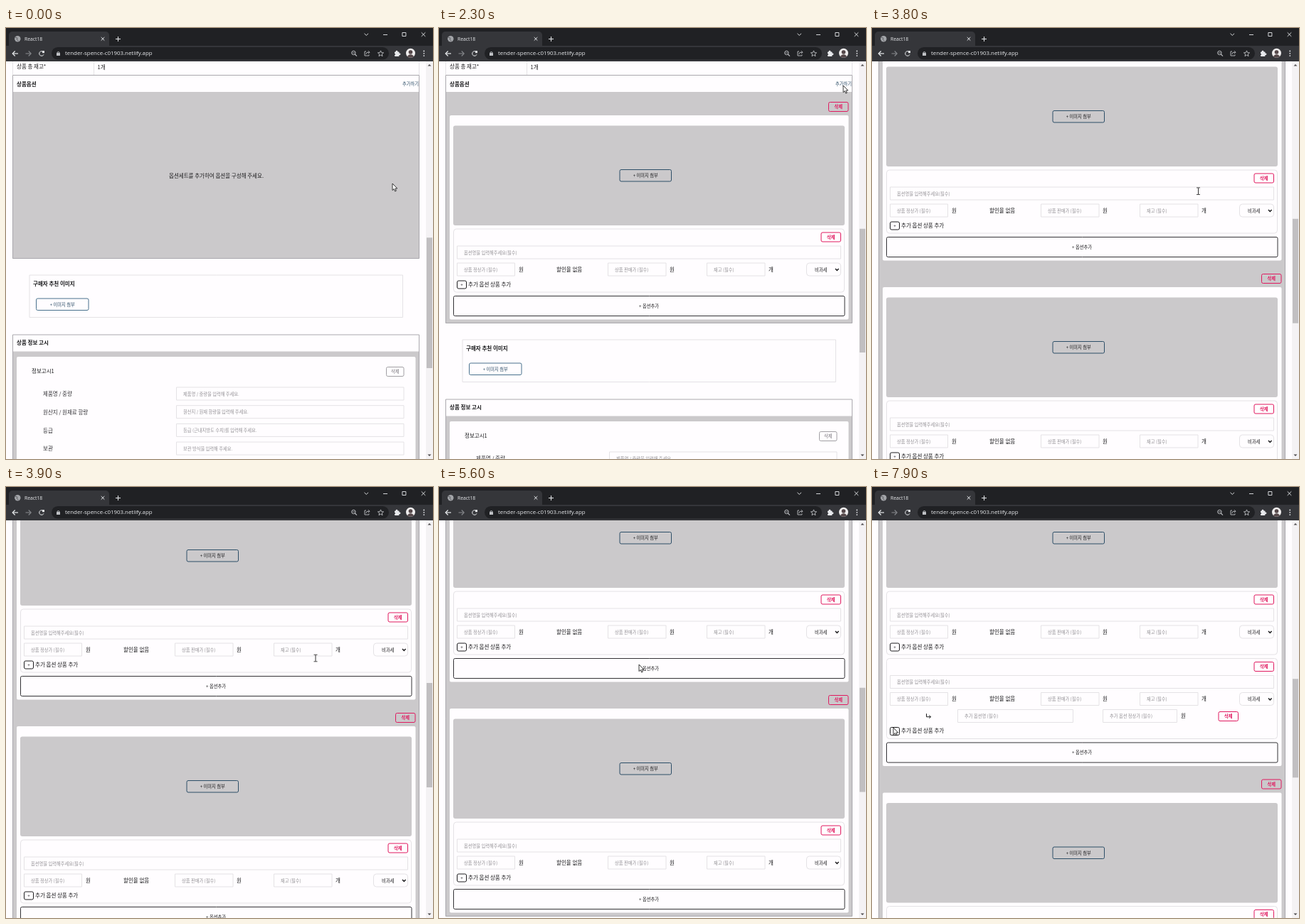
These frames come from a looping animation (600 by 607 pixels, 8 s). An HTML page with a canvas:

```html
<!DOCTYPE html>
<html lang="ko">
<head>
<meta charset="utf-8">
<title>React18</title>
<style>
html, body { margin: 0; width: 100%; height: 100%; overflow: hidden; background: #fffdff; }
canvas { display: block; width: 600px; height: 607px; }
</style>
</head>
<body>
<canvas id="stage"></canvas>
<script>
const W = 600, H = 607, LOOP = 8000, TOP = 47;
const canvas = document.getElementById('stage');
const dpr = window.devicePixelRatio || 1;
canvas.width = W * dpr;
canvas.height = H * dpr;
const c = canvas.getContext('2d');

const KR = '"Noto Sans CJK KR", "Noto Sans CJK", "Noto Sans", sans-serif';
const UI = '"Open Sans", "Noto Sans", sans-serif';
const PAPER = '#fffdff', GRAY = '#cbc9cb', INK = '#1c1c1e', PINK = '#e0195f';
const NAVY = '#2c4e67', FAINT = '#e4e2e5', HINT = '#929094', EDGE = '#aaa8ad';

// Times at which the page gains a part
const ADD_FIRST = 1100, ADD_SECOND = 2500, ADD_OPTION = 5700, ADD_EXTRA = 7300;

const pointerPath = [
  [0, 543, 219], [300, 546, 203], [600, 559, 130], [900, 568, 82], [1000, 568, 81],
  [2500, 568, 81], [2700, 562, 115], [3000, 553, 184], [3300, 532, 195], [3400, 529, 196],
  [3500, 529, 196], [3900, 435, 241], [4400, 392, 238], [4900, 330, 246], [5300, 285, 251],
  [5600, 281, 250], [5800, 281, 250], [6200, 105, 243], [6500, 48, 237], [6900, 33, 306],
  [7100, 30, 315], [7300, 30, 315], [7700, 30, 339], [8000, 30, 339]
];
const scrollPath = [[0, 0], [3500, 0], [3900, 111], [4200, 136], [8000, 136]];

function along(path, t) {
  let i = 1;
  while (i < path.length - 1 && path[i][0] < t) i++;
  const a = path[i - 1], b = path[i];
  const k = (t - a[0]) / (b[0] - a[0]);
  return a.slice(1).map((v, n) => v + (b[n + 1] - v) * k);
}

function fill(x, y, w, h, color, r = 0) {
  c.fillStyle = color;
  c.beginPath();
  c.roundRect(x, y, w, h, r);
  c.fill();
}

function frame(x, y, w, h, color, r = 0, lw = 1) {
  c.strokeStyle = color;
  c.lineWidth = lw;
  c.beginPath();
  c.roundRect(x, y, w, h, r);
  c.stroke();
}

function line(color, lw, ...pts) {
  c.strokeStyle = color;
  c.lineWidth = lw;
  c.beginPath();
  for (let i = 0; i < pts.length; i += 2) c.lineTo(pts[i], pts[i + 1]);
  c.stroke();
}

function disc(x, y, r, color) {
  c.fillStyle = color;
  c.beginPath();
  c.arc(x, y, r, 0, 7);
  c.fill();
}

// y is the optical middle of the line
function text(str, x, y, { size = 7.5, color = INK, weight = 400, align = 'left', font = KR } = {}) {
  c.font = `${weight} ${size}px ${font}`;
  c.fillStyle = color;
  c.textAlign = align;
  c.fillText(str, x, y + size * 0.37);
}

function button(label, x, y, w, h, color, ink = color, weight = 500) {
  frame(x + .5, y + .5, w - 1, h - 1, color, 2);
  text(label, x + w / 2, y + h / 2, { size: 6.25, color: ink, weight, align: 'center' });
}

const removeButton = (x, y) => button('삭제', x, y, 28.5, 14, PINK, PINK, 700);

function input(hint, x, y, w) {
  frame(x + .5, y + .5, w - 1, 18, FAINT);
  text(hint, x + 10, y + 9.7, { size: 6.25, color: HINT });
}

function option(y, extra) {
  const h = extra ? 114 : 90;
  frame(20.5, y + .5, 549, h - 1, FAINT, 4);
  removeButton(536.5, y + 5);
  input('옵션명을 입력해주세요(필수)', 25, y + 24, 540);
  const row = y + 48, mid = row + 9.7;
  input('상품 정상가 (필수)', 25, row, 82);
  text('원', 112, mid);
  text('할인율 없음', 165, mid);
  input('상품 판매가 (필수)', 237, row, 82.5);
  text('원', 324, mid);
  input('재고 (필수)', 376, row, 82.5);
  text('개', 463, mid);
  frame(516.5, row + .5, 48, 18, FAINT, 4);
  text('비과세', 528, mid, { size: 6.25, weight: 500 });
  line(INK, 1.5, 557, mid - 1.3, 559.3, mid + 1.2, 561.6, mid - 1.3);
  if (extra) {
    const e = y + 72, m = e + 9.7;
    line(INK, 1, 76.5, m - 3.5, 76.5, m + 1, 82.5, m + 1);
    line(INK, 1, 80.3, m - 1.2, 82.5, m + 1, 80.3, m + 3.2);
    input('추가 옵션명 (필수)', 120, e, 163);
    input('추가 옵션 정상가 (필수)', 324, e, 105);
    text('원', 434, m);
    removeButton(486.5, e + 3);
  }
  const p = y + h - 17;
  button('+', 25, p, 14, 12, INK);
  text('추가 옵션 상품 추가', 41, p + 5.6);
  return y + h + 4.5;
}

// Draws one option set, returns the bottom of its card
function optionSet(y, options) {
  const card = y + 33;
  let height = 287.5;
  if (options.length > 1) height += 94.5;
  if (options.some(Boolean)) height += 24;
  removeButton(547, y + 14);
  fill(15, card, 560.5, height, PAPER, 2);
  fill(20, y + 47.5, 550, 140.5, GRAY, 3);
  button('+ 이미지 첨부', 253.5, y + 109, 73.5, 17.5, NAVY, INK);
  let next = y + 192.5;
  for (const extra of options) next = option(next, extra);
  frame(20.5, next + .5, 549.5, 28, '#333235', 2);
  text('+ 옵션추가', 295, next + 14.3, { size: 6.25, weight: 500, align: 'center' });
  return card + height;
}

const infoRows = [
  ['제품명 / 중량', '제품명 / 중량을 입력해 주세요.'],
  ['원산지 / 원재료 함량', '원산지 / 원재 함량을 입력해 주세요.'],
  ['등급', '등급 (근내지방도 수치)를 입력해 주세요.'],
  ['보관', '보관 방식을 입력해 주세요.']
];

function lowerSections(end) {
  frame(33, end + 23.5, 524.5, 59.5, FAINT);
  text('구매자 추천 이미지', 38, end + 36, { weight: 700 });
  button('+ 이미지 첨부', 42, end + 56, 74.5, 17.5, '#48718d', NAVY);

  const y = end + 107;
  fill(9, y + 24, 572, 300, GRAY);
  frame(9.5, y + .5, 571, 330, EDGE);
  text('상품 정보 고시', 15, y + 12, { weight: 700 });
  fill(15, y + 31.5, 560.5, 300, PAPER, 2);
  text('정보고시1', 36, y + 52);
  button('삭제', 534, y + 45.5, 25.5, 14, '#a19fa3', '#77757a', 400);
  infoRows.forEach(([label, hint], i) => {
    const row = y + 74 + i * 25.7;
    text(label, 52, row + 10, { color: '#343337' });
    input(hint, 239, row, 320.5);
  });
}

function page(t, scroll) {
  const sets = [];
  if (t >= ADD_FIRST) sets.push([false]);
  if (t >= ADD_SECOND) sets.push([false]);
  if (t >= ADD_OPTION) sets[0].push(t >= ADD_EXTRA);

  let height = 234, grown = 0;
  if (sets.length) {
    height = 325 * sets.length;
    if (t >= ADD_OPTION) height += 94.5;
    if (t >= ADD_EXTRA) height += 24;
    grown = height - 234;
  }

  c.save();
  c.beginPath();
  c.rect(0, TOP, W, H - TOP);
  c.clip();
  fill(0, TOP, W, H - TOP, PAPER);
  c.translate(0, -scroll);
  line(FAINT, 1, 9.5, 0, 9.5, 66);
  line(FAINT, 1, 580.5, 0, 580.5, 66);
  line(FAINT, 1, 123.5, 0, 123.5, 66);
  text('상품 총 재고*', 15, 54, { weight: 500 });
  text('1개', 128.5, 55, { weight: 500 });

  fill(9, 90, 572, height + .5, GRAY);
  frame(9.5, 66.5, 571, height + 24, EDGE);
  text('상품옵션', 15, 79, { weight: 700 });
  text('추가하기', 557, 79, { size: 6.25, color: NAVY, weight: 500 });
  if (!sets.length) {
    text('옵션세트를 추가하여 옵션을 구성해 주세요.', 295.5, 208, { align: 'center' });
  }
  let y = 90;
  for (const options of sets) y = optionSet(y, options) + 4.5;
  lowerSections(90 + height + .5);
  c.restore();

  scrollbar(scroll + 728, 1650 + grown);
}

function scrollbar(offset, total) {
  const track = 542, k = track / total;
  fill(590, TOP, 10, H - TOP, '#f4f2f4');
  fill(591, 56 + offset * k, 8, 560 * k, '#c1bfc1');
  c.fillStyle = '#4c4b4d';
  c.beginPath();
  for (const [y, d] of [[53.5, -1], [600.5, 1]]) {
    c.moveTo(592.5, y);
    c.lineTo(597.5, y);
    c.lineTo(595, y + 2.6 * d);
    c.closePath();
  }
  c.fill();
}

function ring(x, y, r, color, from = 0, to = Math.PI * 2) {
  c.strokeStyle = color;
  c.lineWidth = 1;
  c.beginPath();
  c.arc(x, y, r, from, to);
  c.stroke();
}

function browser() {
  const light = '#e8eaed', soft = '#bfc1c5';
  fill(0, 0, W, TOP, '#202124');
  fill(4, 5, 141, 22, '#35363a', [5, 5, 0, 0]);
  fill(0, 25, W, 22, '#35363a');
  fill(64, 27, 474, 17.5, '#202124', 9);

  disc(16.3, 15.3, 4.2, '#a3a5a9');
  line('#55575b', .9, 13, 13.2, 16, 14.2, 15.3, 16.5, 17.6, 18.2);
  text('React18', 26, 15.2, { size: 6.8, color: light, font: UI });
  line(light, 1, 133.7, 13, 138.3, 17.6);
  line(light, 1, 138.3, 13, 133.7, 17.6);
  line(light, 1, 154, 15.5, 161, 15.5);
  line(light, 1, 157.5, 12, 157.5, 19);
  line(light, .9, 503.5, 7.8, 506.3, 10.4, 509.1, 7.8);
  line(light, .9, 530, 9.5, 536, 9.5);
  frame(556.9, 6.5, 5, 5, light, 0, .9);
  line(light, .9, 583.7, 6.3, 589.3, 11.9);
  line(light, .9, 589.3, 6.3, 583.7, 11.9);

  line(light, 1.2, 17, 36, 9.5, 36);
  line(light, 1.2, 12.7, 32.5, 9.2, 36, 12.7, 39.5);
  line('#85878b', 1.1, 27.5, 36, 35, 36);
  line('#85878b', 1.1, 31.7, 32.5, 35.2, 36, 31.7, 39.5);
  ring(50, 36, 3.3, light, .4, 5.5);
  fill(51, 32.2, 3, 3, light);

  fill(71, 35, 5, 4, soft, .6);
  ring(73.5, 35, 1.5, soft, Math.PI, 0);
  text('tender-spence-c01903.netlify.app', 83, 35.4, { size: 7.9, color: light, font: UI });

  ring(488.4, 35, 2.7, soft);
  line(soft, 1.1, 490.3, 37, 493, 39.7);
  line(soft, .8, 487, 35, 489.8, 35);
  line(soft, .9, 506, 33, 504, 33, 504, 39, 510, 39, 510, 37.5);
  line(soft, .9, 505.7, 37, 507, 34.5, 510.7, 34.2);
  line(soft, .9, 509, 32.2, 511, 34.2, 509, 36.2);
  c.beginPath();
  for (let i = 0; i < 10; i++) {
    const r = i % 2 ? 1.9 : 4.3, a = i * Math.PI / 5 - Math.PI / 2;
    c.lineTo(526.5 + r * Math.cos(a), 36.2 + r * Math.sin(a));
  }
  c.closePath();
  c.stroke();

  fill(546, 33.5, 6.5, 6.5, light, 1);
  disc(549, 33.2, 1.4, light);
  disc(553, 36.8, 1.4, light);
  disc(546, 37, 1.1, '#35363a');

  c.save();
  c.beginPath();
  c.arc(568.5, 35.3, 6.5, 0, 7);
  c.clip();
  fill(561, 28, 15, 15, '#f0eeee');
  disc(568.5, 34, 2.8, '#55484a');
  disc(568.5, 42.2, 5, '#55484a');
  c.restore();
  for (const y of [32.5, 35.8, 39.1]) disc(587.3, y, .9, light);
}

const arrowShape = [0, 0, 0, 9.6, 2.2, 7.6, 3.7, 11, 5.3, 10.3, 3.9, 7, 6.8, 7];

function pointer(t, x, y) {
  if (t >= 3800 && t < 4300) {
    line('#333', 1, x, y - 4.5, x, y + 4.5);
    line('#333', .9, x - 2.5, y - 4.8, x + 2.5, y - 4.8);
    line('#333', .9, x - 2.5, y + 4.8, x + 2.5, y + 4.8);
    return;
  }
  c.beginPath();
  for (let i = 0; i < arrowShape.length; i += 2) c.lineTo(x + arrowShape[i], y + arrowShape[i + 1]);
  c.closePath();
  c.fillStyle = '#fff';
  c.strokeStyle = '#222';
  c.lineWidth = .9;
  c.fill();
  c.stroke();
}

function draw(now) {
  const t = Math.floor((now % LOOP) / 100) * 100;
  c.setTransform(dpr, 0, 0, dpr, 0, 0);
  page(t, Math.round(along(scrollPath, t)[0]));
  browser();
  pointer(t, ...along(pointerPath, t));
}

let start;
function tick(now) {
  start ??= now;
  draw(now - start);
  requestAnimationFrame(tick);
}
draw(0);
requestAnimationFrame(tick);
</script>
</body>
</html>
```
